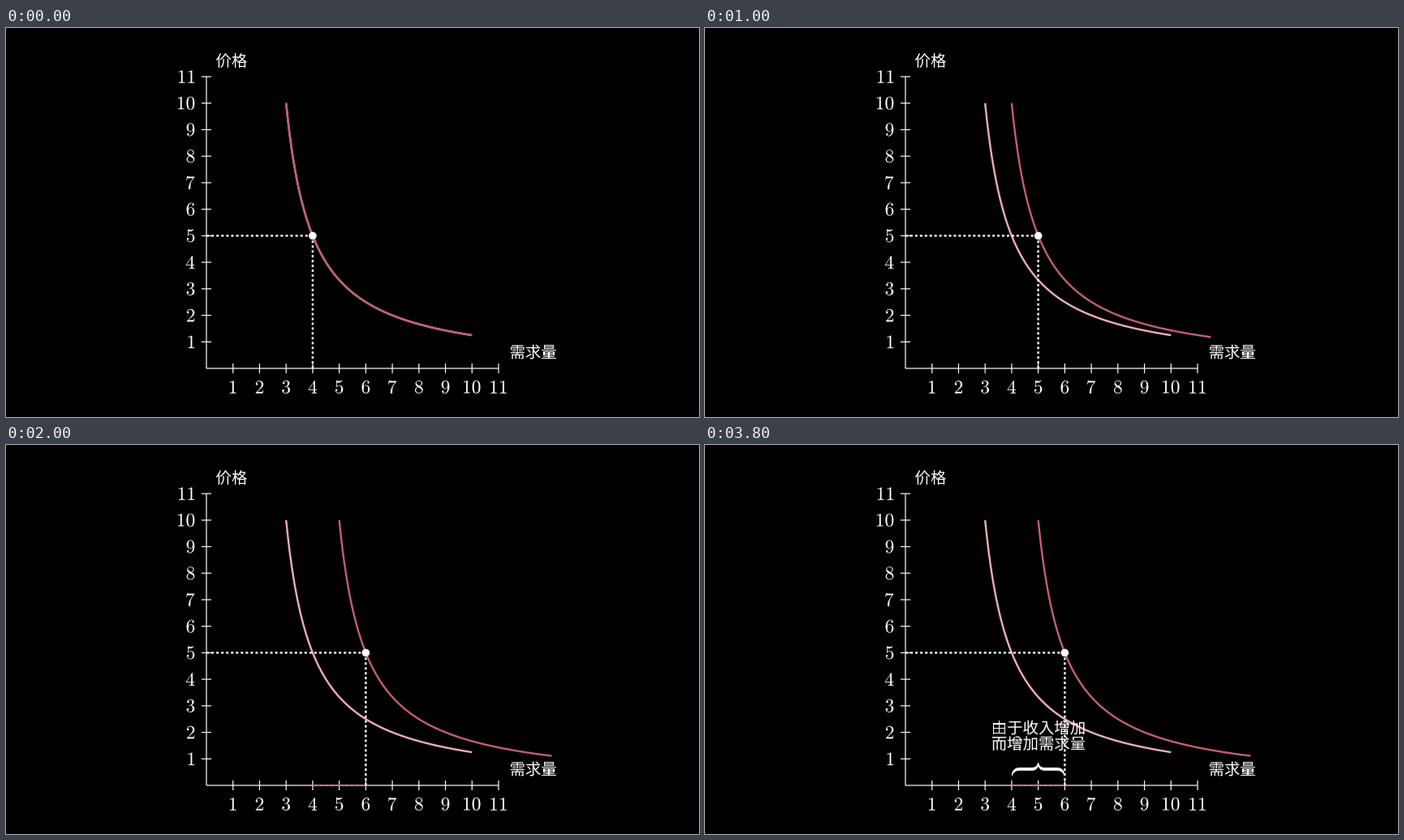
Recreate the animation shown at these times as a matplotlib script. Size 854 by 480 pixels, loop 4000 ms.

```python
import math

import matplotlib.pyplot as plt
import numpy as np
from matplotlib.animation import FuncAnimation
from matplotlib.patches import Circle, PathPatch
from matplotlib.path import Path
from matplotlib.textpath import TextPath

W, H, DPI = 854, 480, 64
PX = 72 / DPI                      # points per pixel
OX, OY, UNIT = 247, 420, 360 / 11  # axes origin and step
FRAMES, INTERVAL = 40, 100
SHIFT_MS, WRITE_MS = 2000, 1000
LIGHT, DARK = "#ECABC1", "#C25D78"
EM, DIGIT_EM = 19.4, 23.5

plt.rcParams["mathtext.fontset"] = "cm"
fig = plt.figure(figsize=(W / DPI, H / DPI), dpi=DPI, facecolor="black")
ax = fig.add_axes([0, 0, 1, 1])
ax.set(xlim=(0, W), ylim=(H, 0))
ax.axis("off")


def smooth(t):
    """Normalised sigmoid easing from 0 to 1."""
    t = min(max(t, 0), 1)
    sig = lambda x: 1 / (1 + math.exp(-x))
    low = sig(-5)
    return min(max((sig(10 * (t - 0.5)) - low) / (1 - 2 * low), 0), 1)


def to_px(x, y):
    return OX + UNIT * x, OY - UNIT * y


def stroke(xs, ys, width, color="white", z=2):
    line, = ax.plot(xs, ys, color=color, lw=width * PX, zorder=z, snap=False,
                    solid_capstyle="butt", solid_joinstyle="round")
    return line


def fill(path=None, z=6):
    patch = PathPatch(path or Path([(0, 0)]), fc="white", lw=0, zorder=z)
    patch.set_visible(path is not None)
    return ax.add_patch(patch)


def number(value, x, y, right=False):
    """Place a number by its ink: centred on x, or ending at x."""
    path = TextPath((0, 0), f"${value}$", size=DIGIT_EM)
    box = path.get_extents()
    dx = x - (box.x1 if right else (box.x0 + box.x1) / 2)
    dy = y + (box.y0 + box.y1) / 2
    fill(Path(path.vertices * [1, -1] + [dx, dy], path.codes), z=3)


def glyphs(text, cx, cy):
    """One path per full-width character, centred on (cx, cy)."""
    left, base = cx - len(text) * EM / 2, cy + 0.38 * EM
    font = {"family": "Noto Sans CJK JP", "weight": "light"}
    paths = []
    for i, char in enumerate(text):
        path = TextPath((0, 0), char, size=EM, prop=font)
        paths.append(Path(path.vertices * [1, -1] + [left + i * EM, base], path.codes))
    return paths


def show_part(patch, polygons, part):
    """Fill only the first part of an outline."""
    left = round(part * sum(len(p) for p in polygons))
    pieces = []
    for poly in polygons:
        if left > 2:
            pieces.append(Path(poly[:left]))
        left -= len(poly)
    patch.set_visible(bool(pieces))
    if pieces:
        patch.set_path(Path.make_compound_path(*pieces))


def dashes(x0, y0, x1, y1, period=6):
    """Evenly spaced dashes that begin and end on a dash."""
    length = math.hypot(x1 - x0, y1 - y0)
    n = math.ceil(length / period)
    start = 2 * np.arange(n) / (2 * n - 1)
    t = np.column_stack([start, start + 1 / (2 * n - 1), np.full(n, np.nan)]).ravel()
    return x0 + (x1 - x0) * t, y0 + (y1 - y0) * t


def quad(a, b, c, n=12):
    t = np.linspace(0, 1, n)[:, None]
    return (1 - t) ** 2 * np.array(a) + 2 * t * (1 - t) * np.array(b) + t ** 2 * np.array(c)


def brace_outline(cx):
    mirror = lambda pts: (pts * [-1, 1])[::-1]
    outer = np.vstack([quad((-32.9, 407.3), (-31.5, 398), (-23, 398)),
                       quad((-8, 398), (-1.5, 398), (-0.5, 392))])
    inner = np.vstack([quad((-32, 408.3), (-30, 401.8), (-23, 401.8)),
                       quad((-8, 401.8), (-2, 401.8), (0, 396.5))])
    ring = np.vstack([outer, mirror(outer), inner * [-1, 1], mirror(inner * [-1, 1])])
    return ring + [cx, 0]


# Axes
stroke([OX, OX + 360], [OY, OY], 1.2)
stroke([OX, OX], [OY, OY - 360], 1.2)
for k in range(1, 12):
    tx, ty = to_px(k, k)
    stroke([tx, tx], [OY - 6, OY + 6], 1.2)
    stroke([OX - 6, OX + 6], [ty, ty], 1.2)
    number(k, tx, 443)
    number(k, 232.3, ty, right=True)
for label in (glyphs("价格", 278, 40), glyphs("需求量", 649.7, 399.5)):
    for glyph in label:
        fill(glyph)

# Demand curves
s = np.linspace(0, 1, 200)
before = np.array([3 + 7 * s, 10 / (1 + 7 * s)])
after = np.array([5 + 8 * s, 10 / (1 + 8 * s)])
stroke(*to_px(*before), 2.4, LIGHT, z=3)
curve = stroke([], [], 2.4, DARK, z=4)
h_line = stroke([], [], 2.4, z=5)
v_line = stroke([], [], 2.4, z=5)
dot = ax.add_patch(Circle((0, 0), 4.8, fc="white", lw=0, zorder=7))

# Explanation of the shift
gap = stroke(*dashes(*to_px(4, 0), *to_px(6, 0)), 2.4, DARK, z=4)
brace = fill()
brace_poly = [brace_outline(to_px(5, 0)[0])]
note = [g.to_polygons() for g in
        glyphs("由于收入增加", 411, 348.5) + glyphs("而增加需求量", 411, 368)]
note_patches = [fill() for _ in note]


def update(frame):
    ms = frame * INTERVAL
    moved = smooth(ms / SHIFT_MS)
    curve.set_data(*to_px(*(before + (after - before) * moved)))
    x, y = to_px(4 + 2 * moved, 5)
    dot.center = x, y
    h_line.set_data(*dashes(OX, y, x, y))
    v_line.set_data(*dashes(x, y, x, OY))

    written = smooth((ms - SHIFT_MS) / WRITE_MS)
    gap.set_visible(ms >= SHIFT_MS)
    show_part(brace, brace_poly, written)
    for i, (patch, polys) in enumerate(zip(note_patches, note)):
        show_part(patch, polys, min(max(written * len(note) - i, 0), 1))
    return []


anim = FuncAnimation(fig, update, frames=FRAMES, interval=INTERVAL,
                     init_func=lambda: update(0), repeat=True, repeat_delay=0)
plt.show()
```
